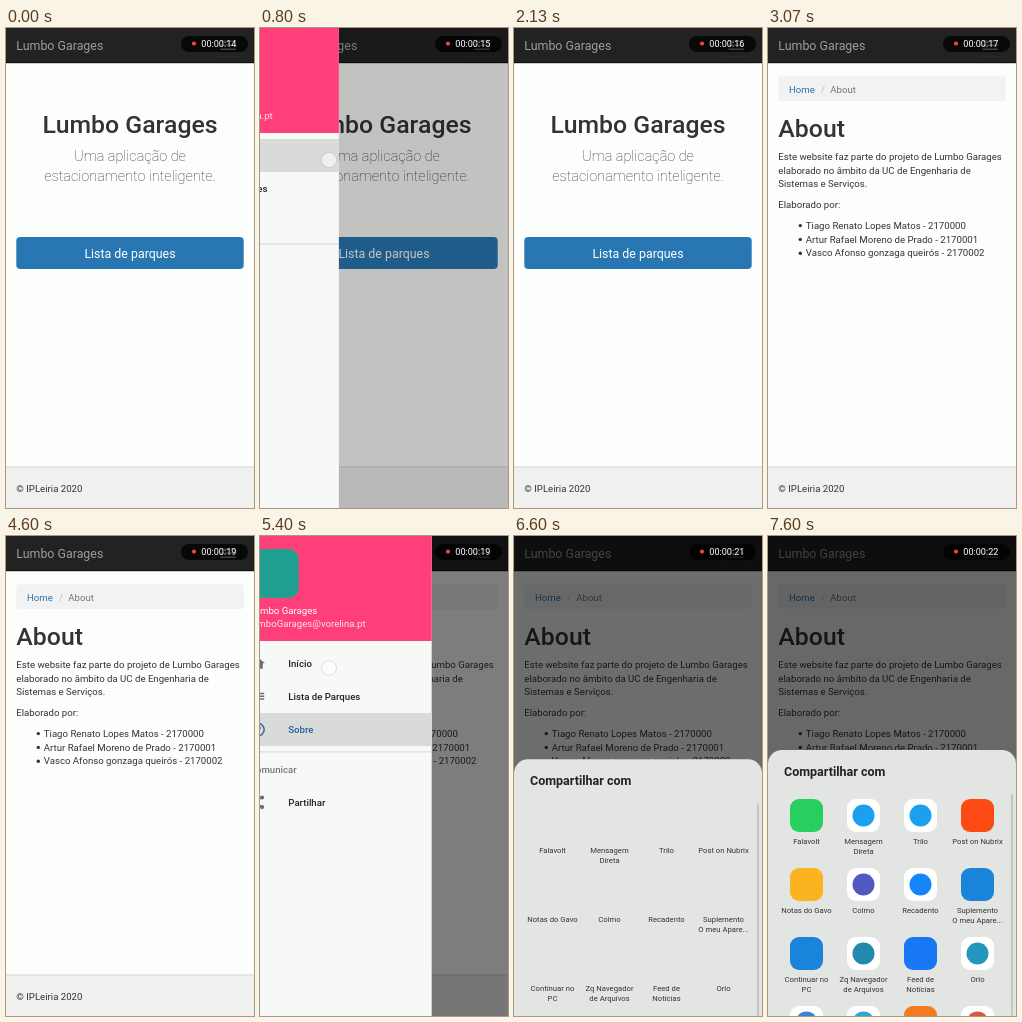
Write an HTML page that moves like this. It is 248 by 480 pixels and loops after 8000 ms.

```html
<!DOCTYPE html>
<html lang="pt">
<head>
<meta charset="utf-8">
<title>Lumbo Garages</title>
<style>
@property --open { syntax: "<number>"; inherits: true; initial-value: 0; }
@property --sheet { syntax: "<number>"; inherits: true; initial-value: 0; }

html, body { margin: 0; height: 100%; overflow: hidden; background: #fcfefb; }
svg { display: block; width: 100%; height: 100%; }
text { font: 9.64px Roboto, sans-serif; fill: currentColor; white-space: pre; }
.mid { text-anchor: middle; }
.medium { font-weight: 500; }
.brand, .button { font-size: 12.4px; }
.title { font-size: 24.8px; font-weight: 500; }
.lead { font-size: 14.47px; font-weight: 200; }
.label { font-size: 7.7px; text-anchor: middle; }
.time { font-size: 9.1px; fill: #fff; }

/* 1% = 80 ms */
#stage { color: #333; animation: drawer 8s infinite, sheet 8s infinite; }
#drawer { transform: translateX(calc((var(--open) - 1) * 193px)); color: #222; }
#scrim { opacity: calc(var(--open) * .57); }
#shade { opacity: calc(var(--sheet) * .59); }
#sheet { transform: translateY(calc((1 - var(--sheet)) * 268px)); }
#home { animation: leave 8s step-end infinite; }
#about { animation: enter 8s step-end infinite; }
#checked { animation: checked 8s step-end infinite; }
#inicio { animation: deselect 8s step-end infinite; }
#sobre { animation: select 8s step-end infinite; }
#finger { animation: finger 8s linear infinite; }
#icons { animation: icons 8s linear infinite; }
#clock { animation: clock 8s infinite; }
.icon { opacity: var(--ink, .65); fill: currentColor; }
.ripple { opacity: 0; fill: #000; animation: ripple 8s linear infinite; }
.late { animation-delay: 4.47s; }

@keyframes drawer {
  0%, 6.625%, 26.625%, 62.5%, 83.3%, 100% { --open: 0; animation-timing-function: linear; }
  9.9%, 65.8% { --open: .352; animation-timing-function: cubic-bezier(.22, 1, .36, 1); }
  15.625%, 20.2%, 71.55%, 76.91% { --open: 1; animation-timing-function: cubic-bezier(.22, 1, .36, 1); }
}
@keyframes sheet {
  0%, 80.875% { --sheet: 0; animation-timing-function: cubic-bezier(.2, .7, .3, 1); }
  83.375%, 100% { --sheet: 1; }
}
@keyframes leave { 0% { visibility: visible; } 35%, 100% { visibility: hidden; } }
@keyframes enter { 0% { visibility: hidden; } 35%, 100% { visibility: visible; } }
@keyframes checked { 0% { transform: none; } 20.2%, 100% { transform: translateY(66px); } }
@keyframes deselect { 0% { color: #3350a8; --ink: 1; } 20.2%, 100% { color: #222; --ink: .65; } }
@keyframes select { 0% { color: #222; --ink: .65; } 20.2%, 100% { color: #2a5f9a; --ink: 1; } }
@keyframes finger {
  0%, 6.62%, 62.49% { transform: translate(4px, 138px); opacity: 0; }
  6.63%, 62.5% { transform: translate(4px, 138px); opacity: 1; }
  9.9%, 11.8%, 65.8%, 67.8% { transform: translate(69px, 132px); opacity: 1; }
  12.2%, 68.2% { transform: translate(69px, 132px); opacity: 0; }
  17.49%, 20.2% { transform: translate(66px, 194px); opacity: 0; }
  17.5%, 19.9% { transform: translate(66px, 194px); opacity: 1; }
  73.37%, 76.4%, 100% { transform: translate(66px, 266px); opacity: 0; }
  73.375%, 76% { transform: translate(66px, 266px); opacity: 1; }
}
@keyframes ripple {
  0%, 17.49% { r: 8px; opacity: 0; }
  17.5% { r: 8px; opacity: .04; }
  19.125% { r: 58px; opacity: .04; }
  20.5% { r: 110px; opacity: .04; }
  22.5%, 100% { r: 180px; opacity: 0; }
}
@keyframes icons { 0%, 83.75% { opacity: 0; } 88%, 100% { opacity: 1; } }
@keyframes clock {
  0% { transform: none; animation-timing-function: step-end; }
  7.5% { transform: translateY(-16px); animation-timing-function: steps(7, end); }
  95%, 100% { transform: translateY(-128px); }
}
</style>
</head>
<body>
<svg id="stage" viewBox="0 0 248 480">
  <defs>
    <clipPath id="pillClip"><rect x="175" y="8" width="67" height="16"/></clipPath>
    <clipPath id="sobreRow"><rect y="177" width="193" height="33"/></clipPath>
    <clipPath id="shareRow"><rect y="250" width="193" height="33"/></clipPath>
  </defs>

  <rect width="248" height="480" fill="#fcfefb"/>
  <rect width="248" height="35" fill="#212221"/>
  <rect y="34.3" width="248" height=".9" fill="#090909"/>
  <text class="brand" x="10.3" y="21.5" color="#9d9d9d">Lumbo Garages</text>
  <rect x="207.5" y="5.6" width="30" height="23" rx="2.7" fill="none" stroke="#2c2c2c" stroke-width=".7"/>
  <path d="M214.5 13.1h15.2m-15.2 4.1h15.2m-15.2 4.1h15.2" stroke="#fff" stroke-width="1.4"/>

  <g id="home">
    <text class="title mid" x="124" y="105">Lumbo Garages</text>
    <text class="lead mid" x="124" y="132.5">Uma aplicação de</text>
    <text class="lead mid" x="124" y="152.5">estacionamento inteligente.</text>
    <rect x="10.3" y="209" width="227.4" height="32" rx="4" fill="#2877b3"/>
    <text class="button mid" x="124" y="229.5" color="#fff">Lista de parques</text>
  </g>

  <g id="about">
    <rect x="10.3" y="48.2" width="227.4" height="24.8" rx="2.8" fill="#f1f2f1"/>
    <text x="21" y="64.5" color="#2f74ad">Home</text>
    <text x="53" y="64.5" color="#bbb">/</text>
    <text x="62.3" y="64.5" color="#777">About</text>
    <text class="title" x="10.3" y="109">About</text>
    <text x="10.3" y="131.8">Este website faz parte do projeto de Lumbo Garages</text>
    <text x="10.3" y="145.6">elaborado no âmbito da UC de Engenharia de</text>
    <text x="10.3" y="159.4">Sistemas e Serviços.</text>
    <text x="10.3" y="180">Elaborado por:</text>
    <g fill="#333"><circle cx="32.3" cy="197.6" r="1.7"/><circle cx="32.3" cy="211.4" r="1.7"/><circle cx="32.3" cy="225.2" r="1.7"/></g>
    <text x="37.8" y="200.8">Tiago Renato Lopes Matos - 2170000</text>
    <text x="37.8" y="214.6">Artur Rafael Moreno de Prado - 2170001</text>
    <text x="37.8" y="228.4">Vasco Afonso gonzaga queirós - 2170002</text>
  </g>

  <rect y="439" width="248" height="41" fill="#f0f0ef"/>
  <rect y="438.6" width="248" height=".8" fill="#ccc"/>
  <text x="10.3" y="464">© IPLeiria 2020</text>

  <rect id="scrim" width="248" height="480"/>

  <g id="drawer">
    <rect width="193" height="480" fill="#f7f9f7"/>
    <rect width="193" height="105" fill="#fe3f7a"/>
    <rect x="11" y="13" width="49" height="49" rx="10" fill="#1fa090"/>
    <g color="#fff">
      <text x="11" y="78">Lumbo Garages</text>
      <text x="11" y="91" opacity=".85">lumboGarages@vorelina.pt</text>
    </g>
    <rect id="checked" y="111" width="193" height="33" fill="#d9dbd9"/>
    <g clip-path="url(#sobreRow)"><circle class="ripple" cx="66" cy="194"/></g>
    <g clip-path="url(#shareRow)"><circle class="ripple late" cx="66" cy="266"/></g>
    <g id="inicio">
      <path class="icon" transform="translate(11 119) scale(.689)" d="M10 20v-6h4v6h5v-8h3L12 3 2 12h3v8z"/>
      <text class="medium" x="49.6" y="131">Início</text>
    </g>
    <path class="icon" transform="translate(11 152) scale(.689)" d="M3 7h2v2H3zm4 0h14v2H7zm-4 4h2v2H3zm4 0h14v2H7zm-4 4h2v2H3zm4 0h14v2H7z"/>
    <text class="medium" x="49.6" y="164">Lista de Parques</text>
    <g id="sobre">
      <g class="icon" transform="translate(11 185.3) scale(.689)">
        <g fill="none" stroke="currentColor" stroke-width="2">
          <circle cx="12" cy="12" r="9"/>
          <path d="M9 10a3 3 0 0 1 6 0c0 2-3 2.3-3 5"/>
        </g>
        <path d="M11 16h2v2h-2z"/>
      </g>
      <text class="medium" x="49.6" y="197.3">Sobre</text>
    </g>
    <rect y="215.3" width="193" height="1.2" fill="#dadcda"/>
    <text class="medium" x="11" y="236.5" color="#777">Comunicar</text>
    <g class="icon" transform="translate(11 258) scale(.689)">
      <path d="M18 5 6 12l12 7" fill="none" stroke="currentColor" stroke-width="2"/>
      <circle cx="18" cy="5" r="3"/><circle cx="6" cy="12" r="3"/><circle cx="18" cy="19" r="3"/>
    </g>
    <text class="medium" x="49.6" y="269.8">Partilhar</text>
  </g>

  <rect id="shade" width="248" height="480"/>

  <g id="sheet" color="#333">
    <rect y="214" width="248" height="290" rx="14" fill="#e3e5e3"/>
    <text x="16" y="239.5" style="font-size:12.5px;font-weight:700" color="#222">Compartilhar com</text>
    <rect x="243" y="258" width="2" height="222" rx="1" fill="#c4c5c4"/>
    <g id="labels"></g>
    <g id="icons"></g>
  </g>

  <circle id="finger" r="7.5" fill="#fff" fill-opacity=".55" stroke="#777" stroke-opacity=".2"/>

  <rect x="175" y="8" width="67" height="16" rx="8" fill="#000" fill-opacity=".74"/>
  <circle cx="188" cy="15.6" r="2.1" fill="#e8483c"/>
  <g clip-path="url(#pillClip)"><g id="clock"></g></g>
</svg>
<script>
const byId = id => document.getElementById(id);

byId("clock").innerHTML = Array.from({ length: 9 }, (_, i) =>
  `<text class="time" x="195.3" y="${19 + i * 16}">00:00:${14 + i}</text>`).join("");

// label, colour, and whether the colour sits as a disc on a white tile
const apps = [
  ["Falavolt", "#27cf5f"], ["Mensagem|Direta", "#1d9ff0", true],
  ["Trilo", "#1d9ff0", true], ["Post on Nubrix", "#fb4a14"],
  ["Notas do Gavo", "#f9b41f"], ["Colmo", "#5059c0", true],
  ["Recadento", "#1585fa", true], ["Suplemento|O meu Apare...", "#1a84da"],
  ["Continuar no|PC", "#1a84da"], ["Zq Navegador|de Arquivos", "#2289ad", true],
  ["Feed de|Notícias", "#1877f2"], ["Orlo", "#2496bd", true],
  ["", "#3d83d8", true], ["", "#2ca5e0", true], ["", "#f47b20"], ["", "#d9573f", true]
];

apps.forEach(([label, colour, disc], i) => {
  const x = 38.5 + i % 4 * 57, y = 263 + Math.floor(i / 4) * 69;
  byId("icons").innerHTML +=
    `<rect x="${x - 16.5}" y="${y}" width="33" height="33" rx="9" fill="${disc ? "#fff" : colour}"/>` +
    (disc ? `<circle cx="${x}" cy="${y + 16.5}" r="11" fill="${colour}"/>` : "");
  byId("labels").innerHTML += label.split("|").map((line, n) =>
    `<text class="label" x="${x}" y="${y + 44.5 + n * 10}">${line}</text>`).join("");
});
</script>
</body>
</html>
```
